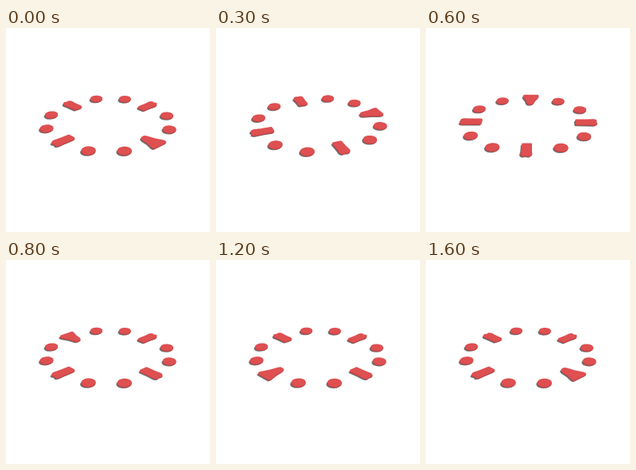
These frames come from a looping animation (256x256 px, 1.7 s). An HTML page with a canvas:

```html
<!DOCTYPE html>
<html lang="en">
<head>
<meta charset="utf-8">
<title>Rotating ring</title>
<style>
  html, body { margin: 0; width: 100%; height: 100%; overflow: hidden; background: #fff; }
  canvas { display: block; width: 100vw; height: 100vh; }
</style>
</head>
<body>
<canvas id="stage" width="256" height="256"></canvas>
<script>
const ctx = document.getElementById('stage').getContext('2d');
const STEP = 100, STEPS = 17, RAD = Math.PI / 180;

// Outlines as [distance from ring centre, sideways offset]
const mirror = half => [...half, ...half.slice().reverse().map(([u, v]) => [u, -v])];
const wedge = mirror([[59.5, 2], [62, 3.4], [72, 5.4], [82, 9.2], [84.8, 9.4]]);
const bar = mirror([[60, 4.6], [72, 4.6], [82, 5.3], [84.5, 3.6], [83.2, 0]]);
const disc = Array.from({ length: 28 }, (_, i) => {
  const a = i / 28 * 2 * Math.PI;
  return [77.3 + 6.8 * Math.cos(a), 6.8 * Math.sin(a)];
});

// Ground plane to screen, with mild perspective and a slight roll
function project(x, y) {
  const scale = 1 / (1 - 0.00155 * y);
  return [128.6 + x * scale - 0.035 * y, 118 + 0.43 * y * scale + 0.007 * x];
}

function outline(shape, angle) {
  const s = Math.sin(angle), c = Math.cos(angle);
  const path = new Path2D();
  for (const [u, v] of shape) path.lineTo(...project(u * s + v * c, u * c - v * s));
  path.closePath();
  return path;
}

function paint(path, color, dx, dy, width) {
  ctx.save();
  ctx.translate(dx, dy);
  ctx.fillStyle = ctx.strokeStyle = color;
  ctx.lineWidth = width;
  ctx.lineJoin = 'round';
  ctx.stroke(path);
  ctx.fill(path);
  ctx.restore();
}

function drawPiece(path) {
  ctx.save();
  ctx.filter = 'blur(0.7px)';
  paint(path, 'rgba(78, 82, 86, 0.8)', -1.3, 1.6, 2.6);
  ctx.restore();
  paint(path, '#b84547', 0, 0.9, 2.4);
  paint(path, '#cf4a4b', 0.1, 0.2, 2.8);
  paint(path, '#de5051', 0.2, -0.7, 2.6);
}

function frame(now) {
  const step = Math.floor(now / STEP) % STEPS;
  const turn = 45 + step * 360 / (STEPS - 1);
  ctx.clearRect(0, 0, 256, 256);
  for (let i = 0; i < 12; i++) {
    const shape = i === 0 ? wedge : i % 3 === 0 ? bar : disc;
    drawPiece(outline(shape, (turn + i * 30) * RAD));
  }
  requestAnimationFrame(frame);
}
requestAnimationFrame(frame);
</script>
</body>
</html>
```
